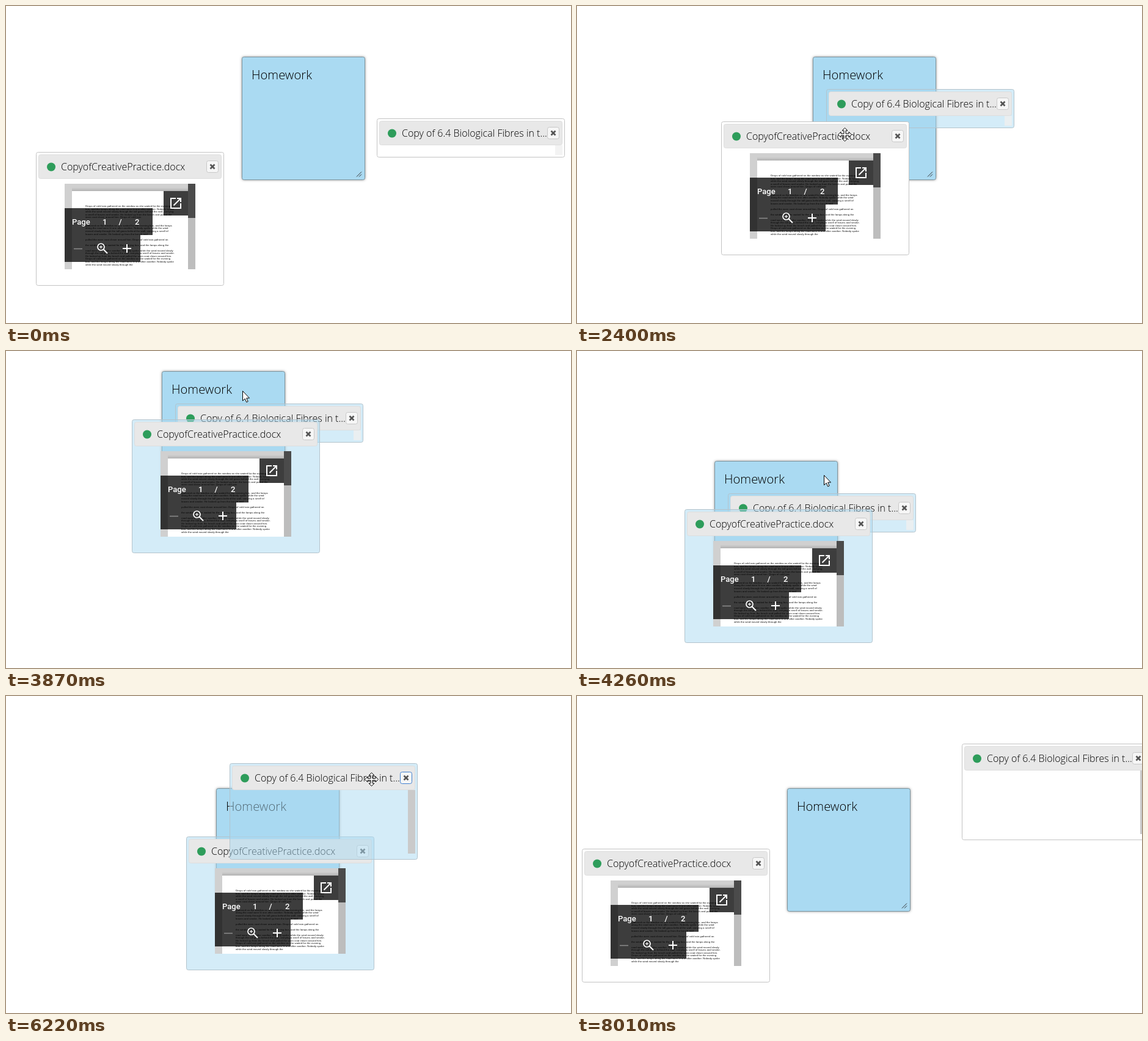
Animation of 925x519 px, one loop 8.62 s. Source, as an HTML page with a canvas:

```html
<!DOCTYPE html>
<html lang="en">
<head>
<meta charset="utf-8">
<title>Grouping files on a note</title>
<style>
html, body { margin: 0; width: 100%; height: 100%; overflow: hidden; background: #fff; }
canvas { display: block; width: 925px; height: 519px; }
</style>
</head>
<body>
<canvas id="stage" width="925" height="519"></canvas>
<script>
const ctx = document.getElementById('stage').getContext('2d');
const LOOP = 8620;
const LIGHT = '"Open Sans", "Noto Sans", sans-serif';
const HEAD = 44;

// Motion helpers
const within = (t, a, b) => t >= a && t < b;
const lerp = (a, b, u) => a + (b - a) * u;
const mix = (p, q, u) => [lerp(p[0], q[0], u), lerp(p[1], q[1], u)];
const add = (p, x, y) => [p[0] + x, p[1] + y];
function ease(t, from, to) {
  const u = Math.min(1, Math.max(0, (t - from) / (to - from)));
  return u * u * (3 - 2 * u);
}

// The grouped note is swung round in quickening circles that become smaller
function swing(t) {
  const s = (t - 4260) / 1000;
  const angle = 1.17 + 7.86 * s + 3.37 * s * s;
  const calm = ease(t, 4480, 4790);
  const circle = [
    lerp(-104, -88, calm) - lerp(145, 46, calm) * Math.cos(angle),
    lerp(17, 1, calm) + lerp(80, 55, calm) * Math.sin(angle + lerp(0.4, 0, calm))
  ];
  const lifted = mix([0, 0], circle, ease(t, 3400, 3800));
  return mix(lifted, [-42, 68], ease(t, 5350, 5570));
}

function pose(t) {
  const [dx, dy] = swing(t);
  const stretch = 94 * ease(t, 5850, 6080);
  let lesson = mix([607, 184], [408, 136], ease(t, 620, 1300));
  lesson = mix(add(lesson, 0, -stretch), [672, 10], ease(t, 6220, 6700));
  let essay = mix([49, 239], [337, 162], ease(t, 1920, 2720));
  essay = mix(essay, [50, 182], ease(t, 7100, 7700));
  return {
    note: [386 + dx, 83 + dy],
    lesson: add(lesson, dx, dy),
    essay: add(essay, dx, dy),
    height: 64 + stretch
  };
}

// The pointer glides from one grip to the next and stays on what it drags
function pointer(t, { lesson, essay }) {
  let p = mix([838, 498], add(lesson, 165, 15), ease(t, 70, 390));
  p = mix(p, add(essay, 202, 21), ease(t, 1290, 1780));
  p = mix(p, add(pose(t + 25).note, 151, 25), ease(t, 2940, 3200));
  p = mix(p, add(lesson, 232, 26), ease(t, 5660, 5850));
  p = mix(p, add(essay, 150, 24), ease(t, 6700, 7100));
  return mix(p, [789, 515], ease(t, 7700, 8005));
}

// Drawing helpers
function place([x, y], paint) {
  ctx.save();
  ctx.translate(Math.round(x), Math.round(y));
  paint();
  ctx.restore();
}

function rect(x, y, w, h, fill) {
  ctx.fillStyle = fill;
  ctx.fillRect(x, y, w, h);
}

function box(x, y, w, h, fill, stroke) {
  ctx.beginPath();
  ctx.roundRect(x + 0.5, y + 0.5, w - 1, h - 1, 3);
  if (fill) { ctx.fillStyle = fill; ctx.fill(); }
  if (stroke) { ctx.strokeStyle = stroke; ctx.lineWidth = 1; ctx.stroke(); }
}

function disc(x, y, r, fill) {
  ctx.fillStyle = fill;
  ctx.beginPath();
  ctx.arc(x, y, r, 0, Math.PI * 2);
  ctx.fill();
}

function text(str, x, y, font, fill = '#000') {
  ctx.font = font;
  ctx.fillStyle = fill;
  ctx.fillText(str, x, y);
}

function line(x1, y1, x2, y2, width, color) {
  ctx.strokeStyle = color;
  ctx.lineWidth = width;
  ctx.beginPath();
  ctx.moveTo(x1, y1);
  ctx.lineTo(x2, y2);
  ctx.stroke();
}

function plus(x, y, r, width) {
  line(x - r, y, x + r, y, width, '#fff');
  line(x, y - r, x, y + r, width, '#fff');
}

// Tiny page text, wrapped into paragraphs with a blank row after each
const TINY = '4.35px "Liberation Sans", Arial, sans-serif';
const story = ('Drops of cold rain gathered on the window as she waited for the evening '
  + 'bus, and the lamps along the road were lit one after another. Nobody spoke while the '
  + 'wind moved slowly through the tall grass behind the wall, carrying a smell of leaves '
  + 'and smoke. He looked up from the bench and pulled the worn coat closer around him.').split(' ');

function layoutPage() {
  const rows = [];
  let word = 0, y = 90;
  ctx.font = TINY;
  for (const count of [5, 0, 4, 1, 1, 6, 1]) {
    for (let n = 1; n <= count; n++) {
      const width = n < count ? 146 : 152 - 12 * count;
      let row = '';
      while (ctx.measureText(row + story[word % story.length]).width < width) {
        row += story[word++ % story.length] + ' ';
      }
      rows.push([row, y]);
      y += 4.55;
    }
    y += 4.55;
  }
  return rows;
}
const pageRows = layoutPage();

const popOut = new Path2D('M19 19H5V5h7V3H3v18h18v-9h-2zM14 3v2h3.6l-9.8 9.8 1.4 1.4L19 6.4V10h2V3z');

function drawToolbar() {
  const dark = 'rgba(0,0,0,.76)';
  rect(209, 64, 40, 40, dark);
  rect(47, 92, 144, 44, dark);
  rect(47, 136, 124, 44, dark);

  ctx.save();
  ctx.translate(217, 72);
  ctx.fillStyle = '#fff';
  ctx.fill(popOut);
  ctx.restore();

  const font = '500 13px Roboto, sans-serif';
  text('Page', 59, 119, font, '#fff');
  [...'1/2'].forEach((c, i) => text(c, 109 + 26.5 * i, 119, font, '#fff'));

  line(62, 158.5, 76, 158.5, 1.5, '#8c8c8c');
  plus(149, 158, 7, 2);
  plus(106.5, 155.5, 2.5, 1.2);
  line(110, 159, 117, 166, 2, '#fff');
  ctx.lineWidth = 1.7;
  ctx.beginPath();
  ctx.arc(106.5, 155.5, 5.5, 0, Math.PI * 2);
  ctx.stroke();
}

function drawPage() {
  ctx.beginPath();
  ctx.rect(47, 52, 214, 140);
  ctx.clip();
  rect(47, 52, 214, 140, '#d0d0d0');
  const shade = ctx.createLinearGradient(0, 58, 0, 64);
  shade.addColorStop(0, 'rgba(0,0,0,0)');
  shade.addColorStop(1, 'rgba(0,0,0,.14)');
  rect(59, 58, 190, 6, shade);
  rect(59, 64, 190, 128, '#fff');
  for (const [row, y] of pageRows) text(row, 81, y, TINY, '#111');
  rect(249, 52, 12, 140, '#bdbdbd');
  rect(249, 52, 12, 56, '#4b4b4b');
  drawToolbar();
}

function drawStrip(height) {
  const open = height > 64;
  rect(292, HEAD, 12, open ? height - 54 : 16, open ? '#cacaca' : 'rgba(240,240,240,.8)');
}

function drawCard(at, height, title, grouped, focused, body) {
  place(at, () => {
    box(0, 0, 308, height, grouped ? 'rgba(170,218,242,.5)' : '#fff', grouped ? '#b3c3cc' : '#c3c3c3');
    box(4, 4, 300, 40, '#e8e8e8', '#dedede');
    disc(25, 24.5, 7, '#2e9d5b');
    text(title, 41, 30, '300 16px ' + LIGHT);
    box(279, 14, 20, 20, '#f6f6f6', focused ? '#3f7fd0' : '#c8c8c8');
    line(285.5, 20.5, 292.5, 27.5, 2.6, '#555');
    line(292.5, 20.5, 285.5, 27.5, 2.6, '#555');
    body(height);
  });
}

function drawNote(at) {
  place(at, () => {
    ctx.shadowColor = 'rgba(0,0,0,.5)';
    ctx.shadowBlur = 4;
    box(0, 0, 202, 202, '#aadaf2');
    ctx.shadowColor = 'transparent';
    box(0, 0, 202, 202, null, '#7d959f');
    text('Homework', 16, 37, '300 20.2px ' + LIGHT);
    for (const d of [8, 4]) line(196 - d, 196.5, 196, 196.5 - d, 1, '#333');
  });
}

function drawHint(alpha) {
  ctx.save();
  ctx.globalAlpha = alpha;
  box(387, 299, 234, 40, '#fff', '#c4c4c4');
  text('Drag files here to group them.', 396, 325, '300 16.5px ' + LIGHT);
  ctx.restore();
}

const arrow = new Path2D('M0 0V16L3.7 12.6L6.2 18.3L8.7 17.2L6.2 11.6H11Z');
const cross = new Path2D();
const arm = [[-1.5, -1.5], [-1.5, -6.5], [-4.5, -6.5], [0, -11], [4.5, -6.5], [1.5, -6.5]];
for (let q = 0; q < 4; q++) {
  const c = Math.round(Math.cos(q * Math.PI / 2)), s = Math.round(Math.sin(q * Math.PI / 2));
  for (const [x, y] of arm) cross.lineTo(c * x - s * y, s * x + c * y);
}
cross.closePath();

function drawPointer(at, cards) {
  const onHeader = cards.some(([x, y]) =>
    within(at[0], x, x + 308) && within(at[1], y, y + HEAD));
  const shape = onHeader ? cross : arrow;
  place(at, () => {
    ctx.translate(0.5, 0.5);
    ctx.fillStyle = '#fff';
    ctx.strokeStyle = '#000';
    ctx.lineWidth = 1;
    ctx.fill(shape);
    ctx.stroke(shape);
  });
}

function draw(t) {
  const now = pose(t);
  const held = within(t, 5830, 6720);
  const lesson = () => drawCard(now.lesson, Math.round(now.height),
    'Copy of 6.4 Biological Fibres in t...', within(t, 1320, 6720), held, drawStrip);
  const essay = () => drawCard(now.essay, 219,
    'CopyofCreativePractice.docx', within(t, 2790, 7720), false, drawPage);

  rect(0, 0, 925, 519, '#fff');
  drawNote(now.note);
  for (const paint of held ? [essay, lesson] : [lesson, essay]) paint();
  drawHint(0.65 * ease(t, 3180, 3380) * (1 - ease(t, 3400, 3520)));
  if (within(t, 70, 8005)) drawPointer(pointer(t, now), [now.lesson, now.essay]);
}

const start = performance.now();
function tick() {
  const t = (performance.now() - start) % LOOP;
  draw(Math.floor(t / 10) * 10);
  requestAnimationFrame(tick);
}
tick();
</script>
</body>
</html>
```
